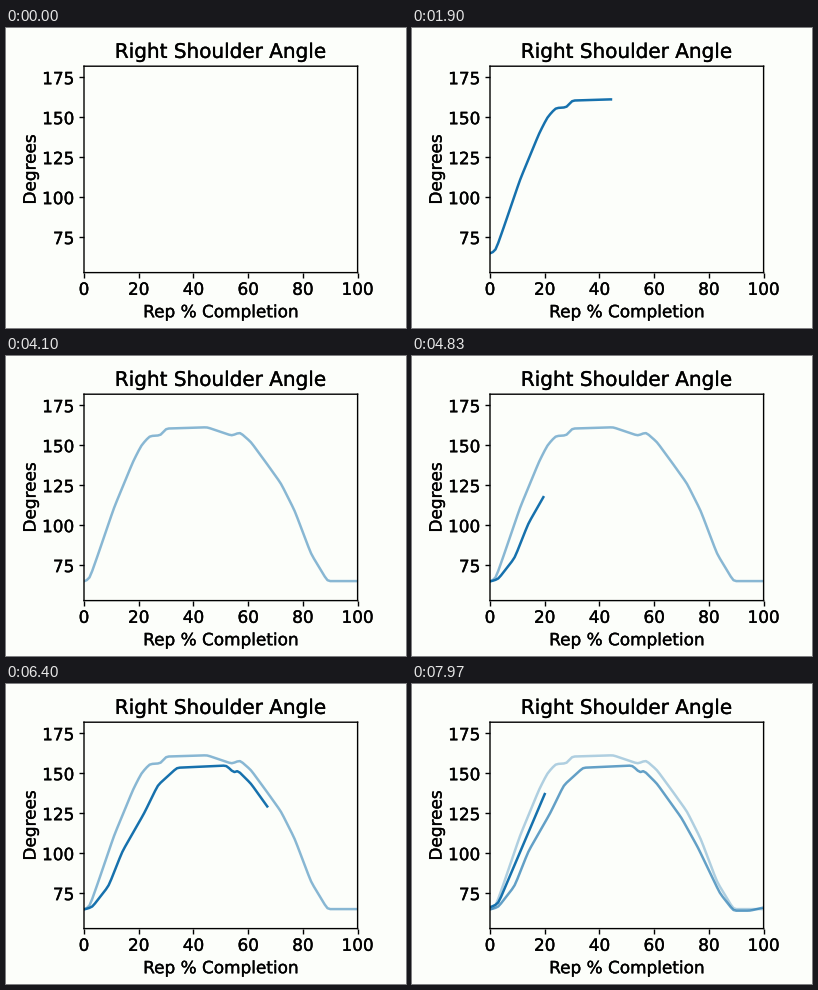
A matplotlib script that plays this animation: 400x300 px, repeating every 8000 ms.

```python
import numpy as np
import matplotlib.pyplot as plt
from matplotlib.animation import FuncAnimation
from matplotlib.patheffects import withStroke
from matplotlib.text import Text

W, H = 400, 300
LEFT, RIGHT, TOP, BOTTOM = 78, 351.6, 38.2, 244.6
STEP_MS, FRAMES = 25, 320
FPS = 30
PERCENT = np.arange(101)

plt.rcParams.update({
    "font.family": "DejaVu Sans", "font.size": 12.15, "axes.titlesize": 14.4,
    "lines.linewidth": 1.8, "axes.linewidth": 1,
    "xtick.major.width": 1, "ytick.major.width": 1,
    "xtick.major.pad": 2.4, "ytick.major.pad": 3.5,
})


def curve(*keys):
    """Angle at every percent: straight runs between keys, corners softened."""
    angle = np.interp(PERCENT, *zip(*keys))
    return np.convolve(np.pad(angle, 1, mode="edge"), [0.2, 0.6, 0.2], "valid")


# Each repetition: pace as (video step, percent), then its angle curve
REPS = [
    ([(1, 0), (25, 24), (82, 60), (122, 100)],
     curve((0, 64.7), (2, 66.5), (5, 81), (11, 111), (18, 140), (21, 150),
           (24, 155.7), (28, 156.2), (30, 160.4), (45, 161.2), (54, 156),
           (57, 158), (61, 152), (67, 138), (72, 126), (77, 109), (83, 82),
           (89, 65), (100, 65))),
    ([(123, 0), (167, 39), (221.5, 100)],
     curve((0, 64.7), (3, 66.3), (9, 79.5), (14, 101), (22, 125), (27, 142.5),
           (34, 153.4), (52, 154.8), (55, 150), (56, 152), (61, 143.5),
           (70, 122), (76, 103.5), (84, 75), (89, 64), (95, 64), (100, 66))),
    ([(222, 0), (239, 20)],
     curve((0, 66), (3, 68.5), (22, 145))),
]

fig = plt.figure(figsize=(W / 100, H / 100), dpi=100, facecolor="#fcfefa")
ax = fig.add_axes([LEFT / W, 1 - BOTTOM / H, (RIGHT - LEFT) / W,
                   (BOTTOM - TOP) / H], facecolor="none")
ax.set(xlim=(0, 100), ylim=(52.8, 181.9), xticks=range(0, 101, 20),
       yticks=range(75, 176, 25), title="Right Shoulder Angle")
ax.set_xlabel("Rep % Completion", labelpad=3.2)
ax.set_ylabel("Degrees", labelpad=1.8)
lines = [ax.plot([], [], color="#1671ad")[0] for _ in REPS]

# Soft, slightly heavy rendering: no pixel snapping, thin outline on text
for artist in ax.findobj():
    artist.set_snap(False)
for text in ax.findobj(Text):
    text.set_path_effects([withStroke(linewidth=0.25, foreground="black")])


def draw(i):
    step = round((i * STEP_MS + 5) * FPS / 1000)
    started = max(1, sum(step >= pace[0][0] for pace, _ in REPS))
    for n, (line, (pace, angle)) in enumerate(zip(lines, REPS)):
        tip = np.interp(step, *zip(*pace))
        x = np.append(np.arange(np.ceil(tip)), tip) if tip > 0 else []
        line.set_data(x, np.interp(x, PERCENT, angle))
        line.set_alpha(min(1, (n + 1) / started))
    return lines


anim = FuncAnimation(fig, draw, frames=FRAMES, interval=STEP_MS,
                     repeat=True, repeat_delay=0, blit=False)
plt.show()
```
